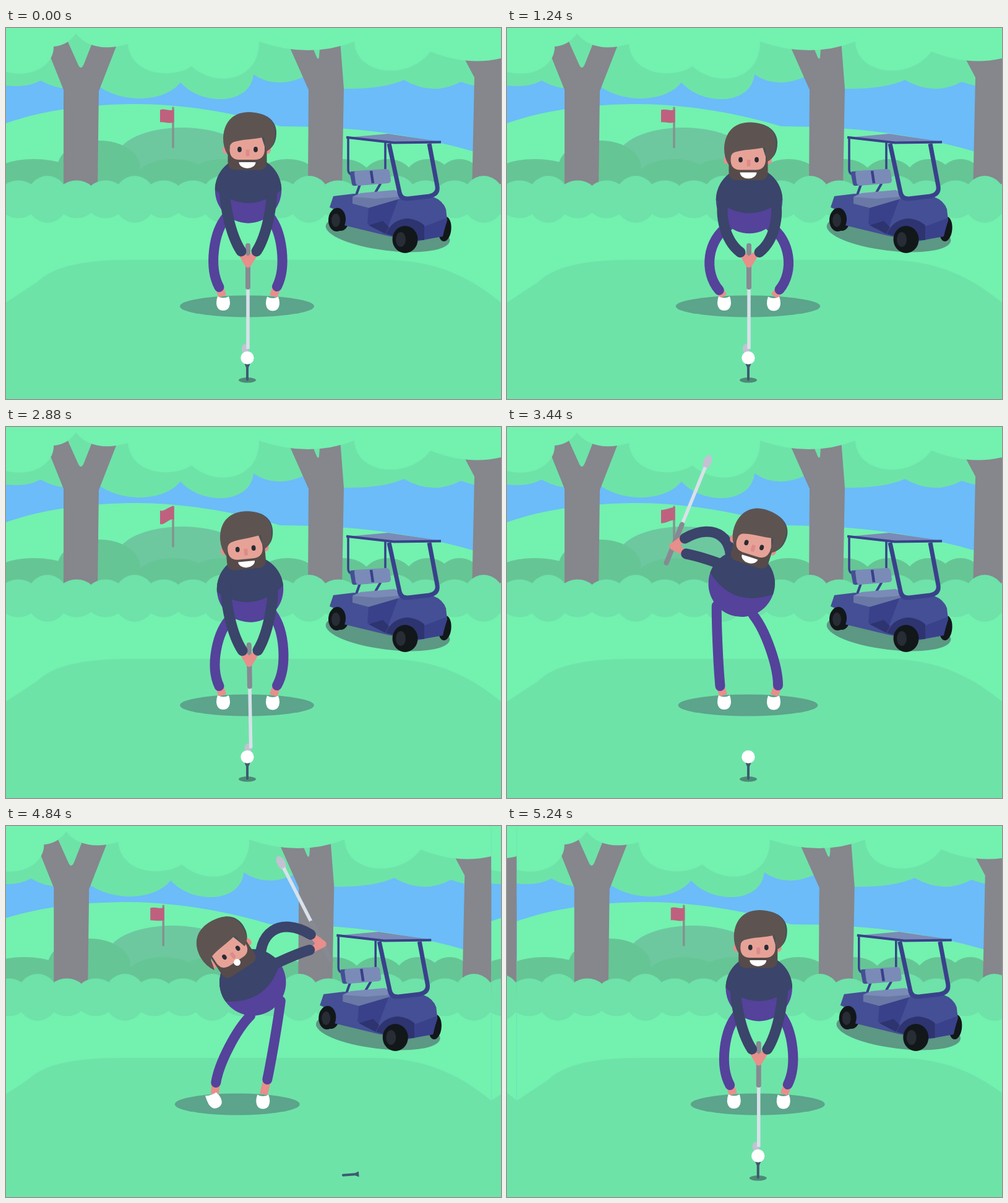
Recreate the animation shown at these times as an HTML page with a canvas. Size 800 by 600 pixels, loop 5.28 s.

```html
<!DOCTYPE html>
<html lang="en">
<head>
<meta charset="utf-8">
<title>Golf swing</title>
<style>
html, body { margin: 0; width: 100%; height: 100%; overflow: hidden; background: #74f2b0; }
canvas { display: block; width: 800px; height: 600px; }
</style>
</head>
<body>
<canvas id="stage" width="800" height="600"></canvas>
<script>
const c = document.getElementById('stage').getContext('2d');
const LOOP = 5280, STEP = 40, HIT = 3880, PAN = 4800;
const LIGHT = '#73f1af', MID = '#6ee3a8', DARK = '#66c595', SKY = '#6bbcf8', BARK = '#86868d';
const NAVY = '#3b446a', PURPLE = '#54429b', SKIN = '#e88e8b', FACE = '#e7a297', HAIR = '#5d5452';
const { PI, sin, cos, min, max, abs, hypot } = Math;
const rad = deg => deg * PI / 180;
const clamp = v => max(0, min(1, v));
const ease = u => u * u * (3 - 2 * u);

// ---------- drawing helpers ----------
function fill(color, d) { c.fillStyle = color; c.fill(new Path2D(d)); }
function line(color, width, d, cap = 'round') {
  c.strokeStyle = color; c.lineWidth = width; c.lineCap = cap; c.lineJoin = 'round';
  c.stroke(new Path2D(d));
}
function oval(color, x, y, rx, ry = rx, deg = 0) {
  c.fillStyle = color;
  c.beginPath(); c.ellipse(x, y, rx, ry, rad(deg), 0, 2 * PI); c.fill();
}
function at([x, y], deg, draw) {
  c.save(); c.translate(x, y); c.rotate(rad(deg)); draw(); c.restore();
}
function turn(x, y, deg) {
  const s = sin(rad(deg)), k = cos(rad(deg));
  return [x * k - y * s, x * s + y * k];
}
const add = (a, b) => [a[0] + b[0], a[1] + b[1]];

// A limb bowed sideways by `bend`; side is -1 for left, 1 for right.
function limb(color, width, a, b, bend, side) {
  const dx = b[0] - a[0], dy = b[1] - a[1], k = side * bend / hypot(dx, dy) * 2 / 3;
  const ctrl = u => [a[0] + dx * u + dy * k, a[1] + dy * u - dx * k];
  line(color, width, `M${a}C${ctrl(0.25)} ${ctrl(0.75)} ${b}`);
}

// ---------- landscape ----------
function landscape(t) {
  c.fillStyle = SKY;
  c.fillRect(0, 0, 800, 600);
  fill(LIGHT, 'M0 154C60 133 130 123 215 123C300 124 380 140 443 159C560 159 680 172 800 214V600H0Z');
  oval('#6dc8a0', 285, 210, 106, 49);
  fill(DARK, 'M0 235H800V280H0Z');
  for (const x of [45, 150, 270, 350, 455, 545, 617, 682, 733]) {
    oval(DARK, x, x === 150 ? 225 : 243, 75 - x * 0.055, x === 150 ? 43 : 31);
  }
  fill(MID, `M0 0V93Q35 97 56 85Q100 110 140 86C180 124 255 122 282 88C315 126 395 126 400 75
    Q440 103 495 72V96Q600 104 643 84Q690 111 735 87Q770 100 800 96V0Z`);
  fill(BARK, 'M93 262V100L71 45L78 20H99L116 58Q121 70 126 58L141 20L182 20L150 102L148 262Z');
  fill(BARK, 'M488 260L489 100L458 30H495L502 47Q505 53 506 47L508 20H540L546 98L543 260Z');
  fill(BARK, 'M753 268L757 80L740 48H800V268Z');
  fill(LIGHT, `M0 0V71C45 82 78 58 77 30Q100 28 113 9Q140 42 197 26C202 78 270 82 300 62
    C340 98 410 85 409 22Q490 50 563 22C565 76 650 86 686 38Q745 62 800 49V0Z`);
  for (let i = 0; i < 18; i++) oval('#6ee2a8', 20 + 47 * i, 277, 34, 33 + 5 * cos((i - 1) * 2 * PI / 3));
  fill(MID, 'M0 444L50 411C75 387 120 375 200 375H620C700 377 752 405 800 444V600H0Z');
  flag(t);
  cart();
}

function flag(t) {
  const g = t > 1840 && t < 3919 ? sin(PI * (t - 1840) / 693) ** 2 : 0;
  const w = sin(2 * PI * t / 520);
  line('#85928f', 3.5, 'M270 129V193');
  fill('#c0607f', `M249 ${132.5 + 2.5 * g}C256 ${129 + 9 * g + w} 265 ${136 - 10 * g - w} 271.5 ${131.5 - 3 * g}
    V${152 - 2 * g}C265 ${156 - 10 * g - w} 256 ${151 + 9 * g + w} 249 ${152.5 + 4.5 * g}Z`);
}

function cart() {
  const blue = '#444f95', deep = '#39418a', night = '#2d3470', pale = '#7a8bb8', tyre = '#12171a', hub = '#272c35';
  oval('#5c9884', 617, 332, 101, 28, 7);
  oval(tyre, 709, 325, 10.5, 20, 5);
  oval(tyre, 541, 311, 13, 17);
  line(deep, 3.5, 'M553 178V229Q553 235 558 237M613 186V232');
  line(deep, 4, 'M572 253L566 270M605 252L597 266');
  fill(blue, 'M523 290L529 272L562 268L640 275L690 273Q706 279 711 293L713 311L705 337L664 345L616 336L546 319V300Z');
  fill(deep, 'M586 290L634 277L614 331L584 317Z');
  fill(night, 'M586 319L609 312L619 322L613 333Z');
  fill(night, 'M614 333Q624 309 650 308Q666 310 676 319V343H650Z');
  fill(deep, 'M676 321L713 307L706 337L676 342Z');
  fill('#6a78a6', 'M560 273L637 268V276L586 291L560 284Z');
  fill(pale, 'M560 273L573 267L628 262L638 267L634 273L598 276Z');
  fill(blue, 'M558 232Q555 233 556 237L559 252Q560 256 565 255L617 250L614 229Z');
  fill(pale, 'M566 231L614 228Q619 228 620 232L622 246Q622 250 618 251L570 255Q566 255 565 250L563 235Q563 231 566 231Z');
  line(deep, 4.5, 'M590 231L593 251', 'butt');
  line(deep, 7, 'M619 187L636 266Q638 277 650 276L684 272Q699 269 697 256L684 187', 'butt');
  fill(pale, 'M552 177L618 171L703 184L627 186Z');
  line(deep, 4, 'M552 177L627 185.5L701 184.5', 'square');
  oval(tyre, 535, 310, 14, 19, 4);
  oval(hub, 533, 311, 7, 11);
  oval(tyre, 645, 342, 20.5, 22);
  oval(hub, 638, 342, 8, 12);
}

// ---------- golfer ----------
// Arm angle over time: a waggle, the backswing, the hit, the follow-through.
const ARM = [[1840, 0], [2200, -9], [2520, 14], [2880, 1], [3440, -118], [3640, -122], [HIT, 2], [3960, 47], [4320, 120]];

function slope(i) {
  if (i < 1 || i > ARM.length - 2) return 0;
  const rate = j => (ARM[j + 1][1] - ARM[j][1]) / (ARM[j + 1][0] - ARM[j][0]);
  const a = rate(i - 1), b = rate(i);
  return a * b > 0 ? 2 * a * b / (a + b) : 0;
}

function armAngle(t) {
  const last = ARM.length - 1;
  if (t <= ARM[0][0]) return 0;
  if (t >= ARM[last][0]) return ARM[last][1];
  const i = ARM.findIndex(k => k[0] > t) - 1, [t0, a] = ARM[i], [t1, b] = ARM[i + 1];
  const h = t1 - t0, u = (t - t0) / h;
  return a + (b - a) * ease(u) + h * u * (1 - u) * ((1 - u) * slope(i) - u * slope(i + 1));
}

// Knee bobbing before the swing; the last rise is slower.
function bob(t) {
  if (t < 1380) return (1 - cos(2 * PI * t / 920)) / 2;
  return t < 1985 ? (1 + cos(PI * (t - 1380) / 605)) / 2 : 0;
}

function golfer(t) {
  const arm = armAngle(t), u = abs(arm) / 120, side = arm < 0 ? -1 : 1, forward = side > 0;
  const dip = 21 * bob(t), arc = sin(PI * u);
  const sway = t > 2280 && t < 3480 ? sin(PI * (t - 2280) / 1200) ** 2 : 0;
  const twist = side * (forward ? 1 : 0.55) * u ** 1.3;
  const lean = -35 * twist - 5.5 * sway;
  const rise = 9 * u * u, step = forward ? u * u : 0;

  const middle = 391.5 + 23 * twist;
  const body = [middle + 3 * sway, 262 - rise + dip];
  const reach = 111 - 5 * u + (forward ? 18 : -45) * arc;
  const wrist = add([middle + 1, 250 - rise], turn(0, reach, -arm));
  const hand = -0.72 * arm, clubAngle = -arm - side * 87 * u * u;

  const swell = t < 1840 ? 10.5 * bob(t) : 0;
  oval('#5ca48b', 389.5, 450, 108.5 + swell + (forward ? -7.5 * clamp(2.5 * u) : 4.5 * u), 17.5);

  const footL = [344.5 + 10.5 * step - dip * 0.1, 419 - 4 * step + dip * 0.3];
  const footR = [438 + dip * 0.15, 418 - 8 * step + dip * 0.3];
  line(SKIN, 13, `M${footL}L${350 + 3 * step} 434M${footR}L432 434`, 'butt');
  at([351 + step, 443], forward ? -30 * u : 0, () => shoe(4 * step));
  at([431, 443.5], 0, () => shoe(0));
  for (const s of [-1, 1]) {
    const hip = add(body, turn(34 * s, 42, lean * s > 0 || s * side < 0 ? lean : lean / 2));
    const bend = s === side ? 28 - 26 * u : 30 - 15 * u + 12 * arc;
    limb(PURPLE, 16, hip, s < 0 ? footL : footR, bend + dip * 0.9, s);
  }

  at(body, lean, () => {
    oval(PURPLE, 0, 0, 53.7);
    c.save();
    c.clip(new Path2D('M-56 -2Q0 44 56 -2V-60H-56Z'));
    oval(NAVY, 0, 0, 53.8);
    c.restore();
  });

  at(add(wrist, turn(-1.5, 20, hand)), clubAngle, () => club(clubAngle));
  at(wrist, hand, () => fill(SKIN, 'M-17 5L-8 2L-1.5 8L5 2L15 5L3 24Q-2 29 -6 24Z'));
  for (const s of [-1, 1]) {
    const outer = s === side;
    const shoulder = add(body, turn((outer ? 37 - 12 * u : 37) * s, -12, lean));
    const cuff = add(wrist, turn((12.5 + dip * 0.18) * s, dip * 0.1, hand));
    const bend = outer ? 16 + 62 * u ** 1.5 : 16 - 25 * clamp(2.5 * u);
    limb(NAVY, 17, shoulder, cuff, bend + dip * 0.9, s);
  }
  at(add(body, turn(-1, -65.5 + 6 * step, lean)), lean * 0.95, () => head(clamp((step - 0.4) / 0.6)));
}

function shoe(stretch) {
  fill('#fff', `M-9 ${-9 - stretch}Q0 ${-4 - stretch} 9 -9Q11 -4 11 2Q10 14 0 14Q-10 14 -11 2Q-11 -4 -9 ${-9 - stretch}Z`);
}

function club(angle) {
  const open = min(1, abs(angle) / 40);
  oval('#c3c2d3', -4.5 * (1 - open), 138 + 9 * open, 5.5 + open, 8 + 4 * open, -8 * (1 - open));
  line('#d9e1ea', 5.5, 'M0 40V138', 'butt');
  line('#868a92', 8, 'M0 -29V38');
}

// Origin lies midway between the eyes.
function head(gasp) {
  oval(SKIN, -35.5, 0.5, 5, 6.5);
  oval(SKIN, 32.5, 0.5, 5, 6.5);
  fill('#564b4a', 'M-32 -18H31V20Q31 33 18 33H-19Q-32 33 -32 20Z');
  fill(FACE, 'M-29 -22H27.5V2Q26 16 12 16.5H-14Q-28 16 -29 2Z');
  at([-6 * gasp, 0], 0, () => {
    fill('#465158', 'M10 -59C34 -58 46.5 -44 46.5 -27C46.5 -11 40 -2 30 3Z');
    fill(HAIR, `M-32 9Q-40 -4 -39.5 -19C-38 -47 -21 -60.5 2 -60.5C28 -60 44 -48 44 -28
      C44 -11 40 -2 30.5 3L27 -8Q29 -15 26 -20C10 -16 -8 -17 -23 -12Q-29 -9 -29 -2Z`);
  });
  fill('#dd8b8a', 'M-3 0H3V9Q3 11 0 11Q-3 11 -3 9Z');
  for (const x of [-13, 13]) oval('#292b35', x, 0, 3.4, 4.4);
  const w = 13.5 - 8 * gasp, y = 20.5 - 2 * gasp;
  c.fillStyle = '#fff';
  c.beginPath();
  c.ellipse(-0.5, y, w, 10 - 4.5 * gasp, 0, 0, PI);
  c.ellipse(-0.5, y, w, 5.5 * gasp, 0, PI, 2 * PI);
  c.fill();
}

// ---------- ball and tee ----------
function tee(t) {
  const u = clamp((t - HIT) / (PAN - HIT));
  at([390 + 195 * u, 544 - 216 * u + 235 * u * u], 446 * u, () => {
    fill('#3f5a70', 'M-4.5 -1H4.5L2 5V25Q0 28 -2 25V5Z');
  });
}

function scene(t, x) {
  c.save();
  c.beginPath(); c.rect(x, 0, 800, 600); c.clip();
  c.translate(x, 0);
  const k = max(0, (t - HIT) / STEP);
  landscape(t);
  oval('#4c8a76', 390 + 165.5 * k, 569.5, 14, 4.2);
  golfer(t);
  tee(t);
  oval('#fff', 390 + 159 * k, 533.5 - 75 * k, 10.6);
  c.restore();
}

function frame(now) {
  const t = Math.floor(max(0, now - start) % LOOP / STEP) * STEP;
  const shift = 800 * ease(clamp((t - PAN) / (LOOP - PAN)));
  scene(t, -shift);
  if (shift > 0) scene(0, 800 - shift);   // the next golfer slides in
  requestAnimationFrame(frame);
}
const start = performance.now();
frame(start);
</script>
</body>
</html>
```
